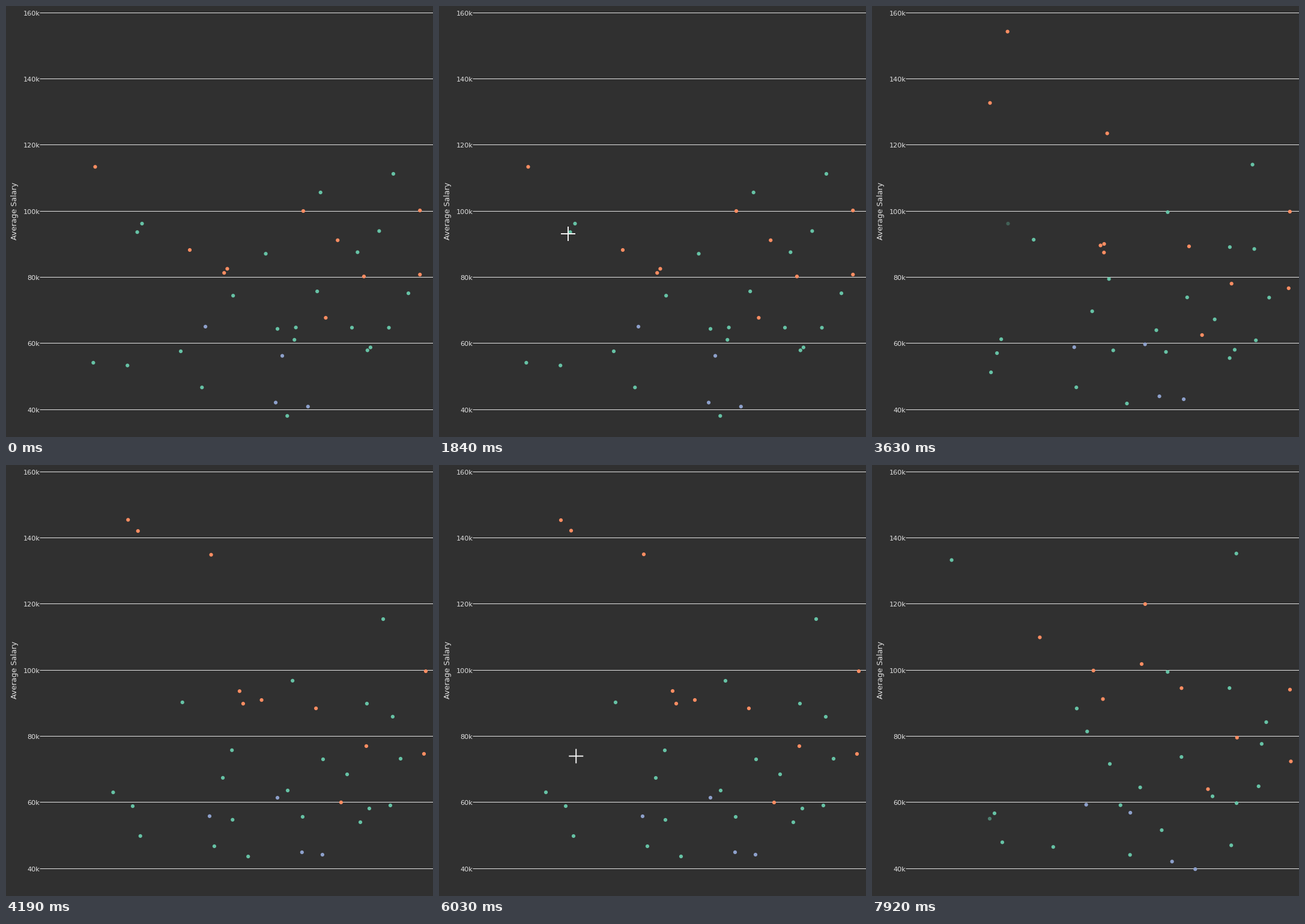
A matplotlib script for the animation above (8000 ms loop, 711 by 719 pixels).

```python
import math

import matplotlib.pyplot as plt
import numpy as np
from matplotlib.animation import FuncAnimation
from matplotlib.colors import to_rgba
from matplotlib.patches import Polygon

W, H, DPI = 711, 719, 100
LOOP, STEP = 8000, 20
PX = 72 / DPI  # points per pixel

BG, INK, GRID = "#303030", "#e2e2e2", "#e4e4e4"
ORANGE, GREEN, BLUE = "#fc8d62", "#66c2a5", "#8da0cb"

# Outliers with a place for each of the three years; the pointer visits the first.
LEADERS = [
    (ORANGE, (148.5, 268.3), (220, 109.5), (326, 427)),
    (ORANGE, (272, -58), (203, 92), (430, -143)),
    (ORANGE, (495, 342), (341, 149), (544, 297)),
    (ORANGE, (306, 407), (426, 392), (467, 285)),
    (GREEN, (645, 280), (628, 257), (590, 62)),
    (GREEN, (291, 576), (178, 546), (97, -145)),
]
# Every other dot has one place, in the middle year, and drifts around it.
CROWD = {
    ORANGE: [(389, 377), (395, 398), (516, 406), (600, 469), (699, 344),
             (696, 482), (558, 563)],
    GREEN: [(657, 490), (601, 398), (568, 516), (477, 360), (494, 587),
            (644, 420), (528, 491), (469, 543), (361, 522), (224, 619),
            (294, 396), (211, 569), (376, 476), (403, 653), (377, 592),
            (347, 636), (590, 596), (640, 568), (605, 573)],
    BLUE: [(452, 555), (527, 650), (493, 646), (339, 586)],
}
FADERS = [(226.5, 363), (196, 590)]  # one leaves, one joins

# Pointer visits: (time, x, y)
VISITS = [
    [(370, 237, 645), (820, 155, 288), (900, 148, 278), (1760, 148, 278),
     (1840, 215, 380), (1990, 416, 707)],
    [(4560, 237, 645), (5090, 212, 160), (5170, 219, 122), (5720, 219, 122),
     (5800, 209, 135), (6120, 237, 645)],
]
EMPLOYED = [514, 752]
REACH = 20.3  # hover distance


def ease(t, first, begin, span=1600):
    """Sine in-out; nothing moves before the first visible step."""
    if t < first:
        return 0.0
    x = min((t - begin) / span, 1)
    return 0.5 - 0.5 * math.cos(math.pi * x)


def drift(spots, rng):
    """Random shift, smaller for dots near the right edge."""
    reach = np.column_stack([10 + 0.2 * (W - spots[:, 0]),
                             np.full(len(spots), 70)])
    moved = spots + rng.uniform(-1, 1, spots.shape) * reach
    return np.minimum(moved, (W - 1, 700))


rng = np.random.default_rng(8)
crowd = np.array([spot for group in CROWD.values() for spot in group], float)
years = []
for k in range(3):
    lead = [row[k + 1] for row in LEADERS]
    rest = crowd if k == 1 else drift(crowd, rng)
    years.append(np.vstack([lead, rest, FADERS]))
colors = ([row[0] for row in LEADERS]
          + [c for c, group in CROWD.items() for _ in group] + [GREEN] * 2)
rgba = np.array([to_rgba(c) for c in colors])

fig = plt.figure(figsize=(W / DPI, H / DPI), dpi=DPI, facecolor=BG)
ax = fig.add_axes([0, 0, 1, 1])
ax.set_xlim(0, W)
ax.set_ylim(H, 0)
ax.axis("off")

for i in range(7):
    y = math.floor(11.2 + 110.34 * i) + 0.5
    ax.plot([57, W], [y, y], color=GRID, lw=PX, zorder=1, snap=False)
    ax.text(56.5, y + 4.5, f"{160 - 20 * i}k", color=INK, ha="right",
            va="baseline", family="DejaVu Sans", size=11.2 * PX)
ax.text(14.5, 342, "Average Salary", color=INK, rotation=90, ha="center",
        va="center", family="DejaVu Sans", size=12.6 * PX)

dots = ax.scatter(*years[0].T, s=(6.2 * PX) ** 2, c=rgba, lw=0, zorder=3)


def stroke(color, width, z, **kw):
    return ax.plot([], [], color=color, lw=width * PX, zorder=z, snap=False,
                   solid_capstyle="butt", **kw)[0]


def spike():
    return (stroke("white", 5, 5),
            stroke(ORANGE, 3, 6, ls=(0, (3, 3)), dash_capstyle="butt"))


across, down = spike(), spike()
bubble = Polygon([(0, 0), (1, 0), (1, 1)], closed=True, fc=ORANGE,
                 ec="#444444", lw=PX, zorder=7)
ax.add_patch(bubble)
label = [ax.text(0, 0, "", color="#444444", va="baseline", zorder=8,
                 family="Liberation Sans", size=13 * PX) for _ in range(3)]
cross_h = stroke("white", 2, 9)
cross_v = stroke("white", 2, 10)
hover_parts = [*across, *down, bubble, *label]


def show_hover(x, y, employed):
    cx, cy = round(x) - 0.5, math.floor(y) + 0.5
    for art in across:
        art.set_data([57, cx + 0.5], [cy, cy])
    for art in down:
        art.set_data([cx, cx], [H, cy])
    left, right, top, low = cx + 10, cx + 155, cy - 27, cy + 27
    bubble.set_xy([(cx + 3.5, cy), (left, cy - 6), (left, top), (right, top),
                   (right, low), (left, low), (left, cy + 6)])
    salary = 142295 + (109.5 - y) / 110.2 * 20000
    rows = ("Occupation: Actuaries", f"Salary: ${salary:.0f}",
            f"Number Employed: {employed}")
    for i, (art, row) in enumerate(zip(label, rows)):
        art.set_position((cx + 16.5, cy - 12.3 + 17 * i))
        art.set_text(row)


def draw(n):
    t = n * STEP
    p, q = ease(t, 2760, 2642), ease(t, 7120, 7058)
    spots = years[0] + (years[1] - years[0]) * p + (years[2] - years[1]) * q
    rgba[-2:, 3] = 1 - p, q
    dots.set_offsets(spots)
    dots.set_facecolors(rgba)

    pointer = hover = False
    for visit, employed in zip(VISITS, EMPLOYED):
        times, xs, ys = zip(*visit)
        if times[0] <= t < times[-1]:
            pointer = True
            x, y = np.interp(t, times, xs), np.interp(t, times, ys)
            hover = math.dist((x, y), spots[0]) < REACH
            if hover:
                show_hover(*spots[0], employed)
            cross_h.set_data([x - 12, x + 12], [y, y])
            cross_v.set_data([x, x], [y - 12, y + 12])
            # the pointer inverts what lies below it
            on_grid = abs((y - 11.5) % 110.34) < 1
            cross_h.set_color("#4a4f58" if hover and on_grid else "#f0f0f0")
            cross_v.set_color("black" if hover else "#f0f0f0")
    for art in hover_parts:
        art.set_visible(hover)
    for art in (cross_h, cross_v):
        art.set_visible(pointer)
    return [dots, cross_h, cross_v, *hover_parts]


anim = FuncAnimation(fig, draw, frames=LOOP // STEP, interval=STEP,
                     init_func=lambda: draw(0), repeat=True, repeat_delay=0)
plt.show()
```
